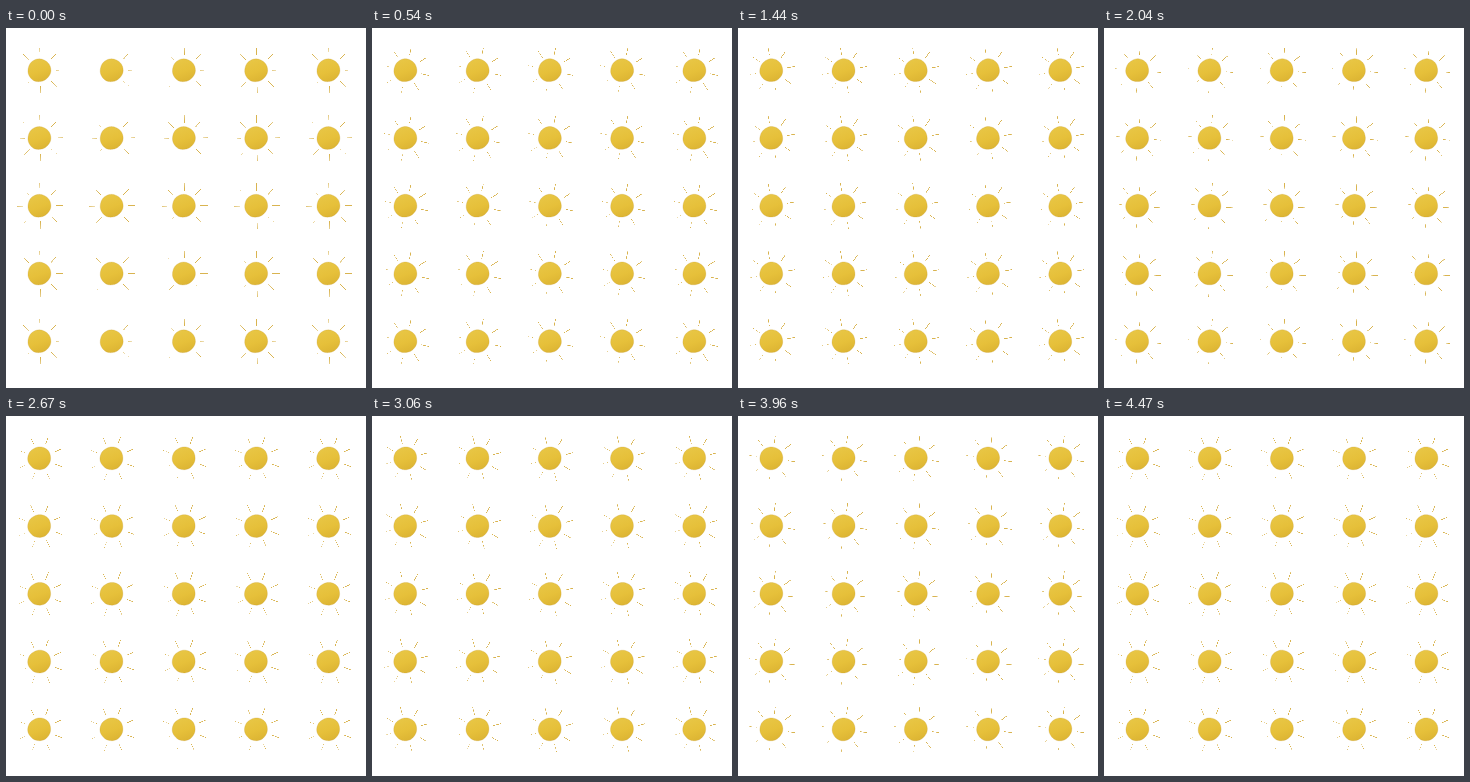
An HTML page with a canvas that plays this animation: 360x360 px, repeating every 4.5 s.

```html
<!DOCTYPE html>
<html lang="en">
<head>
<meta charset="utf-8">
<title>Suns</title>
<style>
html, body { margin: 0; width: 100%; height: 100%; overflow: hidden; background: #fff; }
canvas { display: block; width: 360px; height: 360px; }
</style>
</head>
<body>
<canvas id="stage" width="360" height="360"></canvas>
<script>
const ctx = document.getElementById('stage').getContext('2d');
const LOOP = 4500, STEP = 30, COUNT = 5, RAYS = 8;
const SPEED = 25 * Math.PI / 180; // radians per second
const { sin, cos, PI, abs, floor, min } = Math;

// Painted disc outline: a circle with a few soft lobes
function discPath(turn) {
  const path = new Path2D();
  for (let i = 0; i < 72; i++) {
    const a = i / 72 * 2 * PI;
    const r = 11.4 + 0.14 * cos(2 * a + 1.4) + 0.14 * cos(3 * (a - turn)) + 0.06 * sin(7 * a);
    path.lineTo(r * cos(a), r * sin(a));
  }
  path.closePath();
  return path;
}

const paint = ctx.createLinearGradient(-4, -11, 4, 11);
paint.addColorStop(0, '#e8c645');
paint.addColorStop(0.55, '#e6c03a');
paint.addColorStop(1, '#dcb433');

function drawDisc(path, x, y) {
  ctx.save();
  ctx.translate(x, y);
  ctx.fillStyle = paint;
  ctx.fill(path);
  ctx.lineWidth = 0.5;
  ctx.strokeStyle = 'rgba(190,147,40,.45)';
  ctx.stroke(path);
  ctx.restore();
}

// A hair-thin ray shows only on pixels whose centre it covers,
// so each sun loses different bits of the same drawing.
function drawRay(x, y, angle) {
  const dx = cos(angle), dy = sin(angle);
  const half = 0.27 + 0.13 * cos(angle + 0.5); // heavier on the right
  for (let r = 16; r < 22.6; r += 0.5) {
    const px = x + r * dx, py = y + r * dy;
    const col = floor(px), row = floor(py);
    const off = abs((col + 0.5 - px) * dy - (row + 0.5 - py) * dx);
    if (off > half) continue;
    ctx.globalAlpha = min(1, 0.45 + (half - off) * 3);
    ctx.clearRect(col, row, 1, 1);
    ctx.fillRect(col, row, 1, 1);
  }
  ctx.globalAlpha = 1;
}

function draw(ms) {
  const t = floor(ms % LOOP / STEP) * STEP / 1000;
  const turn = t * SPEED, path = discPath(turn);
  ctx.clearRect(0, 0, 360, 360);
  for (let row = 0; row < COUNT; row++) {
    for (let col = 0; col < COUNT; col++) {
      const x = 33.3 + col * 72.25, y = 42.3 + row * 67.75;
      ctx.fillStyle = '#d9b450';
      for (let i = 0; i < RAYS; i++) {
        drawRay(x + 0.9, y + 0.2, turn - 0.02 + i * PI / 4);
      }
      drawDisc(path, x, y);
    }
  }
}

const start = performance.now();
function tick() {
  draw(performance.now() - start);
  requestAnimationFrame(tick);
}
tick();
</script>
</body>
</html>
```
